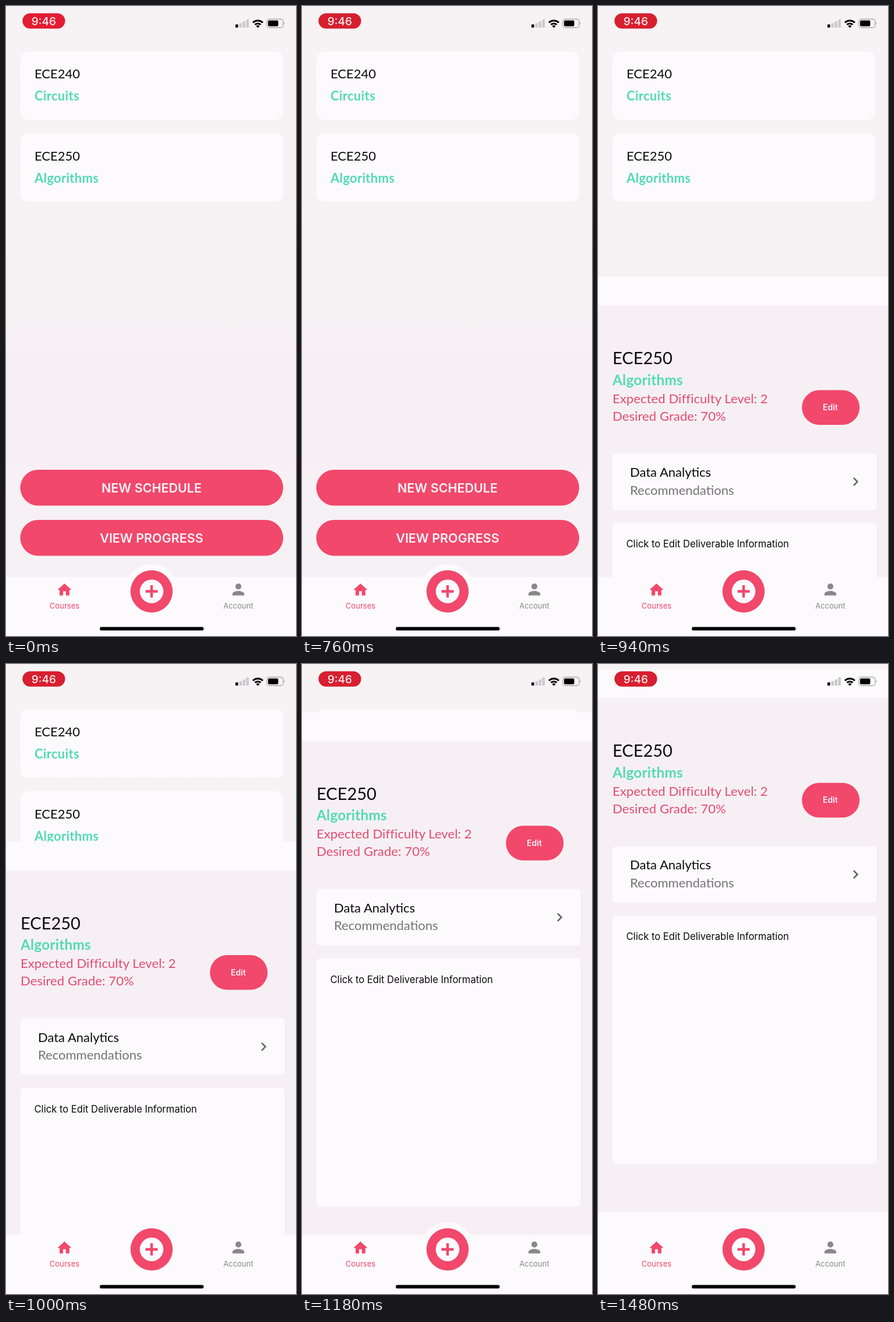
These frames come from a looping animation (498 px wide and 1080 px high, 1510 ms). An HTML page:

```html
<!DOCTYPE html>
<html lang="en">
<head>
<meta charset="utf-8">
<title>Course planner</title>
<style>
  html, body { margin: 0; width: 100%; height: 100%; overflow: hidden; background: #f7f1f4; }
  svg { display: block; width: 100%; height: 100%; }
  text { font: 22px Lato, sans-serif; fill: #0b0a0c; }
  .ui { font-family: Inter, sans-serif; }
  .mid { text-anchor: middle; }
  .white { fill: #fdfafe; }
  .pink { fill: #f1486b; }
  .green { fill: #52dbb2; font-weight: 700; letter-spacing: .3px; }
  .detail { fill: #e64a70; letter-spacing: .1px; }
  .button { font-size: 21.5px; font-weight: 600; fill: #fdf3f7; }
  .tab { font-size: 13.1px; }
  .gray { fill: #8b868c; }
</style>
</head>
<body>
<svg viewBox="0 0 498 1080">
  <defs>
    <linearGradient id="wash" x2="0" y2="1">
      <stop offset="0" stop-color="#f7f3f5"/>
      <stop offset=".5" stop-color="#f6f2f4"/>
      <stop offset=".56" stop-color="#f8eff6"/>
      <stop offset=".71" stop-color="#f8eff6"/>
      <stop offset=".78" stop-color="#f6f1f4"/>
    </linearGradient>
  </defs>

  <g id="courses">
    <rect width="498" height="1080" fill="url(#wash)"/>
    <rect class="white" x="25" y="78" width="451" height="117" rx="13"/>
    <text x="49" y="124">ECE240</text>
    <text class="green" x="49" y="162">Circuits</text>
    <rect class="white" x="25" y="218" width="451" height="117" rx="13"/>
    <text x="49" y="265">ECE250</text>
    <text class="green" x="49" y="303">Algorithms</text>
    <rect class="pink" x="24.5" y="795" width="451.5" height="61.5" rx="30.7"/>
    <text class="ui mid button" x="250" y="834">NEW SCHEDULE</text>
    <rect class="pink" x="24.5" y="881" width="451.5" height="61.5" rx="30.7"/>
    <text class="ui mid button" x="250" y="920">VIEW PROGRESS</text>
  </g>

  <g id="sheet" transform="translate(0 1080)">
    <rect width="498" height="1080" fill="#f6f0f4"/>
    <rect class="white" width="498" height="49"/>
    <rect class="white" y="931" width="498" height="149"/>
    <text x="25" y="150" style="font-size:29px">ECE250</text>
    <text class="green" x="25" y="185.5" style="font-size:24.2px">Algorithms</text>
    <text class="detail" x="25" y="216.5">Expected Difficulty Level: 2</text>
    <text class="detail" x="25" y="246.5">Desired Grade: 70%</text>
    <rect class="pink" x="350.2" y="194.5" width="99" height="59.5" rx="29.7"/>
    <text class="ui mid" x="399" y="229" style="font-size:14px;font-weight:600;fill:#fdf3f7">Edit</text>
    <rect class="white" x="25" y="303" width="453" height="97" rx="6"/>
    <text x="55" y="343">Data Analytics</text>
    <text x="55" y="373.5" style="fill:#777178">Recommendations</text>
    <path d="M439 345l6.5 6.5-6.5 6.5" fill="none" stroke="#69656b" stroke-width="2.6"/>
    <rect class="white" x="25" y="422" width="453" height="425" rx="6"/>
    <text class="ui" x="48.5" y="464" style="font-size:16.6px">Click to Edit Deliverable Information</text>
  </g>

  <g id="tabs">
    <circle class="white" cx="250" cy="1003" r="46"/>
    <rect class="white" y="979" width="498" height="101"/>
    <path class="pink" transform="translate(86 986.5) scale(1.2)" d="M10 20v-6h4v6h5v-8h3L12 3 2 12h3v8z"/>
    <text class="ui mid tab pink" x="100.5" y="1033">Courses</text>
    <circle class="pink" cx="250" cy="1003.5" r="36.2"/>
    <circle class="white" cx="250" cy="1003.5" r="20.3"/>
    <path d="M239.5 1003.5h21M250 993v21" stroke="#f1486b" stroke-width="4.5"/>
    <path class="gray" transform="translate(383.8 985) scale(1.27)"
      d="M12 12a4 4 0 1 0 0-8 4 4 0 0 0 0 8zm0 2c-2.67 0-8 1.34-8 4v2h16v-2c0-2.66-5.33-4-8-4z"/>
    <text class="ui mid tab gray" x="399" y="1033">Account</text>
    <rect x="161" y="1064.4" width="178.5" height="6.2" rx="3.1" fill="#050405"/>
  </g>

  <g id="status">
    <rect id="clock" x="28.3" y="12.4" width="73.2" height="26.4" rx="13.2"/>
    <text class="ui mid" x="64.8" y="32.5" style="font-size:19px;font-weight:500;fill:#fff0f2">9:46</text>
    <rect x="394" y="31.5" width="4.5" height="5.5" rx="1"/>
    <path d="M402.7 29.5v7.5M408.7 26.5v10.5M414.7 23v14" stroke="#cbc7cb" stroke-width="4.5"/>
    <g fill="none" stroke="#000" stroke-width="3">
      <path d="M424 28.5a12 12 0 0 1 17 0M427.5 32a7 7 0 0 1 10 0"/>
    </g>
    <path d="M432.5 37.5l-3-3a4.3 4.3 0 0 1 6 0z"/>
    <rect x="448" y="22.5" width="28" height="14.5" rx="4" fill="none" stroke="#aaa6aa" stroke-width="1.3"/>
    <rect x="450" y="24.8" width="17.5" height="10" rx="2"/>
    <path d="M477.5 27.5q2.5 2.3 0 4.6z" fill="#aaa6aa"/>
  </g>
</svg>
<script>
  const LOOP = 1510, STEP = 30, STEP_OFFSET = 10;
  const SHEET_START = 773, SLOW = 7.3, FAST = 22;
  const sheet = document.getElementById('sheet');
  const clock = document.getElementById('clock');
  const mix = (a, b, k) => Math.round(a + (b - a) * k);

  // Overdamped spring from 1 to 0, starting at rest.
  function spring(ms) {
    const s = Math.max(0, ms) / 1000;
    return (FAST * Math.exp(-SLOW * s) - SLOW * Math.exp(-FAST * s)) / (FAST - SLOW);
  }

  function draw(now) {
    const time = now % LOOP;
    const held = Math.max(0, Math.floor((time - STEP_OFFSET) / STEP) * STEP + STEP_OFFSET);
    sheet.setAttribute('transform', `translate(0 ${(1080 * spring(held - SHEET_START)).toFixed(2)})`);
    const fade = Math.min(1, Math.max(0, (held - 60) / 270));
    clock.setAttribute('fill', `rgb(${mix(227, 215, fade)},${mix(28, 31, fade)},${mix(50, 47, fade)})`);
  }

  const start = performance.now();
  function tick() {
    draw(performance.now() - start);
    requestAnimationFrame(tick);
  }
  tick();
</script>
</body>
</html>
```
